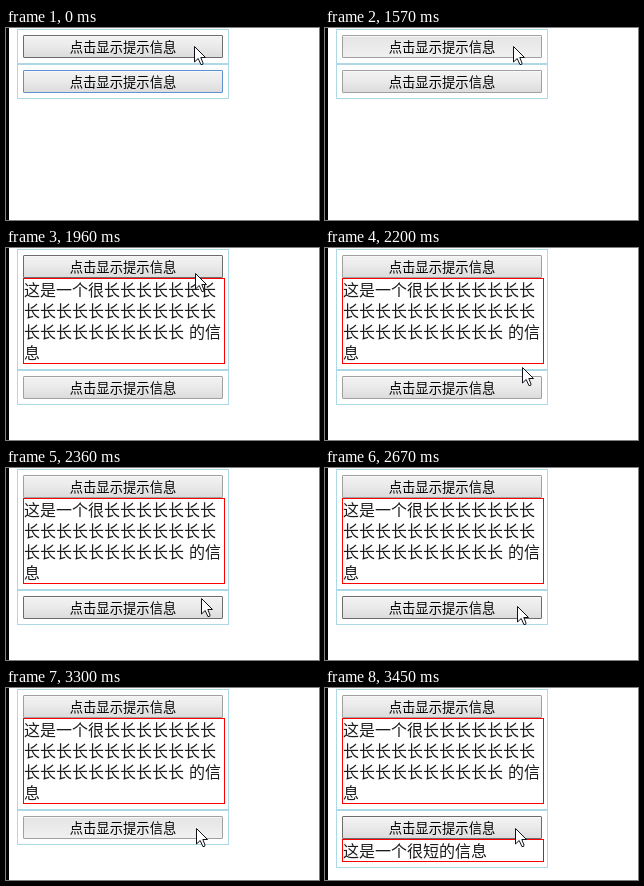
These frames come from a looping animation (313x192 px, 4230 ms). An HTML page:

```html
<!DOCTYPE html>
<html lang="zh-CN">
<head>
<meta charset="utf-8">
<title>点击显示提示信息</title>
<style>
  html, body { margin: 0; width: 100%; height: 100%; overflow: hidden; background: #fff; }

  .stage {
    --face: linear-gradient(#f2f2f2, #ececec 40%, #dcdcdc);
    --pressed: linear-gradient(#e4e4e4, #ececec 60%, #f0f0f0);
    position: relative;
    box-sizing: border-box;
    width: 313px;
    height: 192px;
    padding: 1px 0 0 11px;
    overflow: hidden;
    color: #000;
    font-family: "Noto Sans CJK SC", "Noto Sans CJK", sans-serif;
    font-weight: 300;
  }
  .edge { position: absolute; left: 0; top: 0; width: 3px; height: 192px; background: #000; }

  .panel { width: 200px; padding: 5px; border: 1px solid #add8e6; }

  .button {
    box-sizing: border-box;
    height: 23px;
    border: 1px solid #a0a0a0;
    border-radius: 1px;
    background: var(--face);
    box-shadow: inset 0 1px #f8f8f8;
    font-size: 13.333px;
    line-height: 21px;
    text-align: center;
    white-space: nowrap;
  }

  .fold { width: 202px; height: 0; overflow: hidden; }
  .message {
    border: 1px solid #f00;
    color: #1c1c1c;
    font-size: 16px;
    line-height: 21px;
    white-space: pre;
    word-spacing: 1.5px;
  }

  .cursor { position: absolute; left: 0; top: 0; width: 13px; height: 20px; }

  .button, .fold, .cursor { animation: 4230ms step-end infinite; }
  .first .button { animation-name: first-button; }
  .second .button { animation-name: second-button; }
  .first .fold { animation-name: first-fold; }
  .second .fold { animation-name: second-fold; }
  .cursor { animation-name: move; }

  @keyframes first-button {
    0%, 39.007% { border-color: #6c6c6c; background: var(--face); }
    37.115% { border-color: #a0a0a0; background: var(--pressed); }
    48.226%, 100% { border-color: #a0a0a0; background: var(--face); }
  }
  @keyframes second-button {
    0% { border-color: #5f91d2; background: var(--face); }
    37.115% { border-color: #a0a0a0; background: var(--face); }
    55.791%, 81.56%, 100% { border-color: #6c6c6c; background: var(--face); }
    78.014% { border-color: #a0a0a0; background: var(--pressed); }
  }
  @keyframes first-fold {
    0% { height: 0; }
    39.007%, 100% { height: 86px; }
  }
  @keyframes second-fold {
    0% { height: 0; }
    81.56%, 100% { height: 23px; }
  }
  @keyframes move {
    0% { transform: translate(188px, 18px); }
    46.335% { transform: translate(189px, 25px); }
    48.226% { transform: translate(193px, 57px); }
    50.118% { transform: translate(197px, 97px); }
    52.009% { transform: translate(197px, 119px); }
    53.9% { transform: translate(197px, 126px); }
    55.791% { transform: translate(195px, 130px); }
    57.683% { transform: translate(193px, 133px); }
    59.574% { transform: translate(192px, 136px); }
    63.12% { transform: translate(192px, 138px); }
    66.903% { transform: translate(191px, 139px); }
    68.794%, 100% { transform: translate(190px, 140px); }
  }
</style>
</head>
<body>
<div class="stage">
  <div class="edge"></div>
  <div class="panel first">
    <div class="button">点击显示提示信息</div>
    <div class="fold"><div class="message">这是一个很长长长长长长长
长长长长长长长长长长长长
长长长长长长长长长长 的信
息</div></div>
  </div>
  <div class="panel second">
    <div class="button">点击显示提示信息</div>
    <div class="fold"><div class="message">这是一个很短的信息</div></div>
  </div>
  <svg class="cursor" viewBox="0 0 13 20">
    <path d="M.5 .5V16L4.2 12.5L6.9 18.5H8.6L9 17L6.8 11.5H11.5Z" fill="#fff" stroke="#101018" stroke-linejoin="round"/>
  </svg>
</div>
</body>
</html>
```
